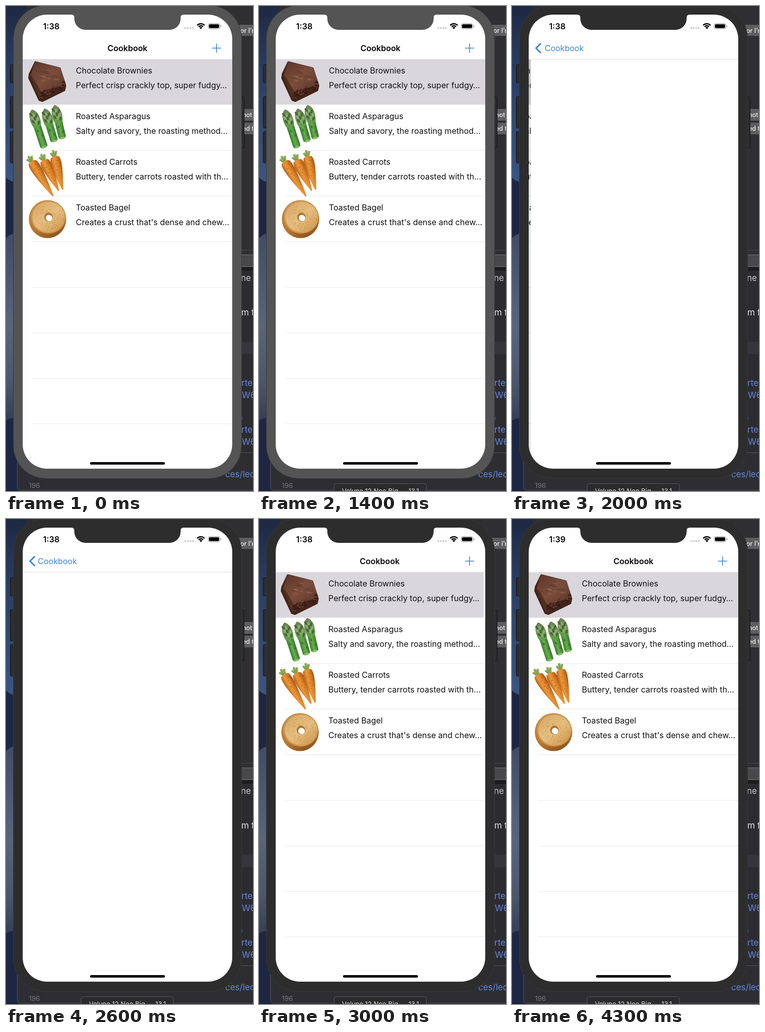
Recreate the animation shown at these times as an HTML page with a canvas. Size 488 by 956 pixels, loop 4500 ms.

```html
<!DOCTYPE html>
<html lang="en">
<head>
<meta charset="utf-8">
<title>Cookbook</title>
<style>
html, body { margin: 0; width: 100%; height: 100%; overflow: hidden; background: #2d2d31; }
canvas { display: block; width: 488px; height: 956px; }
</style>
</head>
<body>
<canvas id="stage"></canvas>
<script>
const W = 488, H = 956, LOOP = 4500, STEP = 100;
const TOOLTIP_AT = 300, FOCUS_AT = 1500, PUSH_AT = 1635, POP_AT = 2621, MINUTE_AT = 3100;
const SCREEN = { x: 33, y: 17, w: 414, h: 895, r: 48 };
const BLUE = '#3b85d6';
const ROWS = [
  ['Chocolate Brownies', 'Perfect crisp crackly top, super fudgy…', drawBrownie],
  ['Roasted Asparagus', 'Salty and savory, the roasting method…', drawAsparagus],
  ['Roasted Carrots', 'Buttery, tender carrots roasted with th…', drawCarrots],
  ['Toasted Bagel', 'Creates a crust that\'s dense and chew…', drawBagel]
];

const canvas = document.getElementById('stage');
const dpr = window.devicePixelRatio || 1;
canvas.width = W * dpr;
canvas.height = H * dpr;
const ctx = canvas.getContext('2d');

function rect(x, y, w, h, fill) {
  ctx.fillStyle = fill;
  ctx.fillRect(x, y, w, h);
}

function round(x, y, w, h, r, fill, stroke, lw = 1) {
  ctx.beginPath();
  ctx.roundRect(x, y, w, h, r);
  if (fill) { ctx.fillStyle = fill; ctx.fill(); }
  if (stroke) { ctx.strokeStyle = stroke; ctx.lineWidth = lw; ctx.stroke(); }
}

function poly(points, fill, r = 0) {
  ctx.beginPath();
  points.forEach(([x, y]) => ctx.lineTo(x, y));
  ctx.closePath();
  ctx.fillStyle = fill;
  ctx.fill();
  if (r) {
    ctx.strokeStyle = fill;
    ctx.lineWidth = r;
    ctx.lineJoin = 'round';
    ctx.stroke();
  }
}

function line(points, color, lw) {
  ctx.beginPath();
  points.forEach(([x, y]) => ctx.lineTo(x, y));
  ctx.strokeStyle = color;
  ctx.lineWidth = lw;
  ctx.stroke();
}

function oval(x, y, rx, ry, fill, turn = 0) {
  ctx.beginPath();
  ctx.ellipse(x, y, rx, ry, turn, 0, Math.PI * 2);
  ctx.fillStyle = fill;
  ctx.fill();
}

function text(str, x, y, color, size = 16, weight = 400, align = 'left') {
  ctx.font = `${weight} ${size}px Inter, Roboto, sans-serif`;
  ctx.textAlign = align;
  ctx.fillStyle = color;
  ctx.fillText(str, x, y);
}

function gradient(x0, y0, x1, y1, stops) {
  const g = ctx.createLinearGradient(x0, y0, x1, y1);
  stops.forEach(([at, color]) => g.addColorStop(at, color));
  return g;
}

function faded(alpha, draw) {
  if (alpha <= 0) return;
  ctx.save();
  ctx.globalAlpha = alpha;
  draw();
  ctx.restore();
}

// Draws along the y axis of a frame running from one point to the other
function along(x0, y0, x1, y1, widen, draw) {
  ctx.save();
  ctx.translate(x0, y0);
  ctx.rotate(Math.atan2(y1 - y0, x1 - x0) - Math.PI / 2);
  ctx.scale(widen, 1);
  draw(Math.hypot(x1 - x0, y1 - y0));
  ctx.restore();
}

function seeded(seed) {
  return () => (seed = (seed * 16807) % 2147483647) / 2147483647;
}

// Critically damped spring, 0 to 1
function spring(ms) {
  if (ms <= 0) return 0;
  const x = ms * 0.01826;
  return 1 - (1 + x) * Math.exp(-x);
}

function drawWallpaper() {
  rect(0, 0, 40, H, '#1d2743');
  ctx.beginPath();
  ctx.moveTo(0, 0);
  ctx.lineTo(40, 0);
  ctx.lineTo(40, 352);
  ctx.quadraticCurveTo(12, 350, 0, 338);
  ctx.fillStyle = gradient(0, 0, 0, 350, [[0, '#1e2942'], [0.35, '#293d63'], [1, '#3a5683']]);
  ctx.fill();
  ctx.beginPath();
  ctx.moveTo(0, 458);
  ctx.quadraticCurveTo(10, 446, 40, 442);
  ctx.lineTo(40, 820);
  ctx.quadraticCurveTo(15, 806, 0, 817);
  ctx.fillStyle = gradient(0, 445, 0, 815, [[0, '#414b67'], [0.5, '#59647d'], [0.8, '#4c566e'], [1, '#363f58']]);
  ctx.fill();
}

function drawDesktop(t) {
  drawWallpaper();
  rect(440, 0, 48, H, '#2f2f32');
  rect(440, 481, 48, 1, '#4c4c4d');
  rect(440, 490, 48, 24, '#747475');
  rect(440, 491, 48, 22, '#48484a');
  rect(440, 515, 48, 7, '#1c1c1e');
  rect(440, 522, 48, H, '#2c2b30');
  rect(440, 662, 48, 24, '#36353b');
  for (const [y, h, str, x] of [[37, 22, 'or I’r', 463], [203, 23, 'not', 467], [230, 23, 'ed t', 467]]) {
    round(452, y, 50, h, 3, '#5e5e60');
    text(str, x, y + 15.5, '#eeeeee', 12.5, 500);
  }
  // Editor window below the phone
  round(22.5, 880.5, 500, 74, 6, '#2e2e32', '#56565a');
  rect(0, 955, W, 1, '#17171b');
  text('ne c', 464, 542, '#c9c9cb', 17);
  text('m f', 465, 610, '#e4e4e5', 17);
  for (const y of [749, 841]) {
    text('rtee', 465, y, '#6288de', 17);
    text('W6', 466, y + 24, '#6288de', 17);
  }
  text('e', 460, 817, '#48699f', 14);
  text('ces/lec', 433, 929, '#6288de', 17);
  text('196', 45, 950, '#77777b', 13.5);
  if (t >= TOOLTIP_AT) {
    round(148.5, 941.5, 182, 30, 4, '#2b2b2d', '#5a5a5c');
    text('Velune 12 Neo Big — 13.1', 240, 960.5, '#dedede', 13, 400, 'center');
  }
}

function drawPhone(color) {
  for (const [x, y, h] of [[8.5, 115.5, 36], [8.5, 178.5, 62], [8.5, 247.5, 62], [463.5, 179.5, 100]]) {
    round(x, y, 7, h, 2, '#2b2c2f', '#131315');
  }
  round(14.5, -1.5, 451, 933, 65, color, '#38383a');
  round(16, 0, 448, 930, 63, color);
}

function drawNotch(color) {
  ctx.beginPath();
  ctx.moveTo(129, 16);
  ctx.lineTo(129, 17);
  ctx.quadraticCurveTo(135, 17, 135, 23);
  ctx.arcTo(135, 47, 159, 47, 22);
  ctx.arcTo(345, 47, 345, 23, 22);
  ctx.lineTo(345, 23);
  ctx.quadraticCurveTo(345, 17, 351, 17);
  ctx.lineTo(351, 16);
  ctx.fillStyle = color;
  ctx.fill();
}

function drawStatus(t) {
  text(t < MINUTE_AT ? '1:38' : '1:39', 89.5, 45.5, '#050505', 16, 600, 'center');
  for (let i = 0; i < 4; i++) oval(354 + i * 5, 43.5, 1.9, 1.9, '#cfcfd1');
  for (const r of [10, 6]) {
    ctx.beginPath();
    ctx.arc(385, 45, r, -Math.PI * 0.76, -Math.PI * 0.24);
    ctx.strokeStyle = '#000';
    ctx.lineWidth = 2.4;
    ctx.stroke();
  }
  ctx.beginPath();
  ctx.moveTo(385, 45.5);
  ctx.arc(385, 45.5, 4, -Math.PI * 0.76, -Math.PI * 0.24);
  ctx.fillStyle = '#000';
  ctx.fill();
  round(399.5, 34.5, 23, 10.5, 3.4, null, '#8f8f91');
  round(401, 36, 20, 7.5, 2, '#000');
  round(424, 38, 1.4, 4, 0.7, '#99999b');
}

function drawBrownie() {
  const rnd = seeded(11);
  poly([[58, 111], [106, 123], [117, 157], [115, 166], [72, 187], [66, 185], [46, 142], [47, 134]], '#43241a', 4);
  poly([[59, 112], [105, 123], [116, 153], [70, 167], [51, 136]],
    gradient(58, 112, 102, 166, [[0, '#60382b'], [0.55, '#7b4d3c'], [1, '#623a2c']]), 4);
  poly([[49, 138], [67, 183], [69, 170], [53, 142]], '#50301f', 2);
  for (let i = 0; i < 44; i++) {
    const k = rnd();
    oval(69 + k * 46, 183 - k * 20 - rnd() * 14, 1 + rnd() * 1.8, 1.2, i % 3 ? '#321911' : '#6a3d2d');
  }
  for (let i = 0; i < 16; i++) {
    faded(0.3, () => oval(65 + rnd() * 40, 124 + rnd() * 30, 3 + rnd() * 4, 1.3, i % 2 ? '#b07e69' : '#4a281d', 0.2));
  }
}

function drawSpear(x0, y0, x1, y1) {
  along(x0, y0, x1, y1, 1.25, len => {
    round(-6, 20, 12, len - 20, [3, 3, 5, 5], gradient(-6, 0, 6, 0, [[0, '#397d2d'], [0.45, '#67ae4c'], [1, '#36772c']]));
    ctx.beginPath();
    ctx.moveTo(0, 0);
    ctx.bezierCurveTo(8, 6, 10, 20, 6, 36);
    ctx.lineTo(-6, 36);
    ctx.bezierCurveTo(-10, 20, -8, 6, 0, 0);
    ctx.fillStyle = gradient(0, 0, 0, 36, [[0, '#6c7f55'], [0.6, '#6f9657'], [1, '#5ca044']]);
    ctx.fill();
    for (let i = 0; i < 9; i++) {
      oval((i % 3 - 1) * 4, 9 + i * 2.5, 1.7, 4, i % 2 ? '#8eaa70' : '#466737', (i % 3 - 1) * 0.35);
    }
    for (let i = 0; i < 2; i++) {
      poly([[i * 5 - 4, 45 + i * 11], [i * 5 - 1, 40 + i * 11], [i * 5, 47 + i * 11]], '#397535');
    }
    oval(0, len - 2, 4.5, 2, '#8bbd68');
  });
}

function drawAsparagus() {
  drawSpear(51, 204, 76, 280);
  drawSpear(76, 202, 96, 268);
  drawSpear(96, 195, 112, 262);
}

function drawCarrot(x0, y0, x1, y1) {
  along(x0, y0, x1, y1, 1.15, len => {
    for (const [x, y] of [[-5, -9], [0, -13], [5, -10]]) {
      line([[0, 3], [x, y]], '#7d9f49', 4);
      line([[1, 3], [x + 1, y]], '#a9bd70', 1);
    }
    ctx.beginPath();
    ctx.moveTo(-7, 1);
    ctx.quadraticCurveTo(0, -3, 7, 1);
    ctx.bezierCurveTo(12, 9, 7, len * 0.55, 1, len);
    ctx.lineTo(-1, len);
    ctx.bezierCurveTo(-7, len * 0.55, -12, 9, -7, 1);
    ctx.fillStyle = gradient(-9, 0, 9, 0, [[0, '#b5611b'], [0.35, '#ea983a'], [0.65, '#de8327'], [1, '#a35216']]);
    ctx.fill();
    for (let i = 0; i < 7; i++) {
      const x = i % 2 ? -4 : 1, y = 8 + i * 6;
      line([[x * (1 - i / 9), y], [(x + 5) * (1 - i / 9), y + 1]], '#b05c1a', 0.8);
    }
  });
}

function drawCarrots() {
  drawCarrot(51, 307, 93, 375);
  drawCarrot(75, 304, 104, 364);
  drawCarrot(96, 297, 112, 362);
}

function drawBagel() {
  const rnd = seeded(29);
  oval(82, 420, 37, 37.5, gradient(60, 390, 95, 457, [[0, '#c28a4a'], [0.6, '#b8772f'], [1, '#8d531f']]));
  oval(83.5, 416, 34.5, 32.5, '#cc9651');
  oval(84, 416, 32, 30, gradient(60, 390, 105, 445, [[0, '#d8a966'], [0.5, '#e5bd7e'], [1, '#d09a50']]));
  for (let i = 0; i < 75; i++) {
    const a = rnd() * Math.PI * 2, r = 11 + rnd() * 20;
    faded(0.5, () => oval(84 + Math.cos(a) * r, 416 + Math.sin(a) * r * 0.93,
      0.7 + rnd() * 1.4, 0.8, i % 2 ? '#b67c37' : '#f0d19a'));
  }
  oval(84, 416, 8.5, 9, '#b07536');
  oval(85, 418, 6.5, 6.3, '#ffffff', 0.4);
}

function drawList(p) {
  ctx.save();
  ctx.beginPath();
  ctx.rect(33, 105, 414 * (1 - p), 820);
  ctx.clip();
  ctx.translate(-124 * p, 0);
  rect(33, 105, 414, 89.5, '#d9d7dc');
  for (let i = 2; i < 9; i++) rect(52, 104 + i * 90 - (i === 8 ? 1 : 0), 395, 1, '#e9e9ea');
  ROWS.forEach(([title, detail, picture], i) => {
    picture();
    text(title, 138, 132.5 + i * 90, '#111113');
    text(detail, 138, 161.5 + i * 90, '#111113');
  });
  ctx.restore();
  // The list only darkens once it is nearly covered
  faded(0.1 * p ** 4, () => rect(33, 105, 414 * (1 - p), 820, '#000'));
}

function drawNav(p, pushing) {
  rect(33, 104.5, 414, 1, '#dededf');
  const x = 240 - 138.5 * p ** (pushing ? 1.25 : 0.92);
  faded(1 - p, () => {
    text('Cookbook', x, 89, '#050505', 16, 600, 'center');
    line([[407, 83], [425, 83]], BLUE, 1.6);
    line([[416, 74], [416, 92]], BLUE, 1.6);
  });
  faded(p * p, () => text('Cookbook', x, 89, BLUE, 16, 400, 'center'));
  faded(p, () => {
    ctx.lineJoin = 'miter';
    line([[57, 73.5], [47.5, 83], [57, 92.5]], BLUE, 3);
  });
}

function draw(t) {
  const pushing = t < POP_AT;
  const p = pushing ? spring(t - PUSH_AT) : 1 - spring(t - POP_AT);
  const bezel = t < FOCUS_AT ? '#545454' : '#2d2d2d';
  ctx.setTransform(dpr, 0, 0, dpr, 0, 0);
  ctx.clearRect(0, 0, W, H);
  drawDesktop(t);
  drawPhone(bezel);
  ctx.save();
  ctx.beginPath();
  ctx.roundRect(SCREEN.x, SCREEN.y, SCREEN.w, SCREEN.h, SCREEN.r);
  ctx.clip();
  rect(SCREEN.x, SCREEN.y, SCREEN.w, SCREEN.h, '#ffffff');
  drawList(p);
  drawNav(p, pushing);
  drawStatus(t);
  round(166, 899, 148, 5, 2.5, '#000');
  drawNotch(bezel);
  ctx.restore();
}

const start = performance.now();
function tick() {
  const t = (performance.now() - start) % LOOP;
  draw(Math.floor(t / STEP) * STEP);
  requestAnimationFrame(tick);
}
tick();
</script>
</body>
</html>
```
